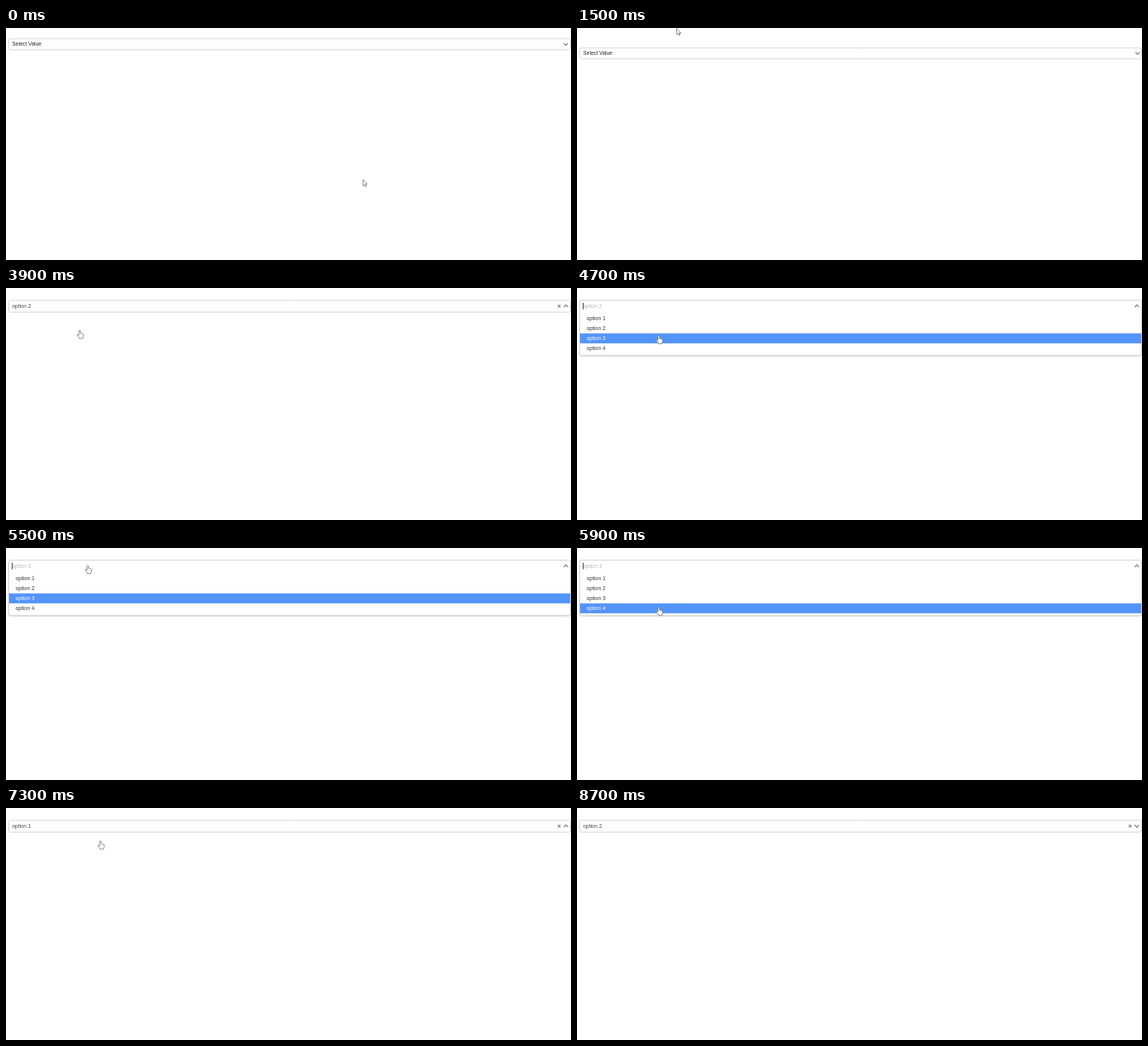
Recreate the animation shown at these times as an HTML page with a canvas. Size 736x303 px, loop 8.8 s.

```html
<!DOCTYPE html>
<html lang="en">
<head>
<meta charset="utf-8">
<title>Select box</title>
<style>
  html, body { margin: 0; width: 100%; height: 100%; overflow: hidden; background: #fff; }
  canvas { display: block; width: 736px; height: 303px; }
</style>
</head>
<body>
<canvas id="stage" width="736" height="303"></canvas>
<script>
const ctx = document.getElementById('stage').getContext('2d');
const LOOP = 8800, STEP = 100, ROW = 13, OPTIONS = 4;
const OPEN_MS = 600, BLUR = 8500;
const LEFT = 3.5, RIGHT = 735.5;
const FONT = '6.9px "Liberation Sans", Arial, sans-serif';

// When the list opens and where the pointer clicks; options are taken in turn
const picks = [
  { open: 1900, x: 86.5, y: 49 },
  { open: 3300, x: 96, y: 55 },
  { open: 4200, x: 106.5, y: 62 },
  { open: 5500, x: 106.5, y: 79 },
  { open: 6400, x: 123, y: 44.5 },
  { open: 7700, x: 124, y: 48 }
];

const mix = (a, b, k) => a + (b - a) * k;
const progress = (t, from, to) => Math.min(1, Math.max(0, (t - from) / (to - from)));
const smooth = k => k * k * (3 - 2 * k);
const easeIn = k => k ** 3;
const easeOut = k => 1 - (1 - k) ** 3;

// The field moves twice as the page around it is laid out
function fieldAt(t) {
  if (t < 800) return { top: 14, height: 14.5, mid: 21, shift: 0, rows: 31 };
  if (t < 2900) return { top: 26, height: 14.2, mid: 32.6, shift: 1, rows: 40.5 };
  return { top: 16, height: 15.5, mid: 23.3, shift: 0, rows: 33 };
}

function pointerAt(t, field) {
  const i = picks.findLastIndex(p => t >= p.open);
  if (i < 0) {
    const k = smooth(progress(t, 0, 900));
    const leave = progress(t, 1200, 1700);
    return [mix(465, 119, k) + 18 * leave, mix(198, 22, k ** 1.7) - 36 * leave];
  }
  const pick = picks[i], next = picks[i + 1];
  const rest = field.mid - 1;
  const close = pick.open + OPEN_MS;
  if (t < close) {
    const k = easeOut(progress(t, pick.open, close));
    const from = i ? picks[i - 1].x : pick.x + 10;
    return [mix(from, pick.x, k), mix(rest, pick.y, k)];
  }
  if (next) return [pick.x, mix(pick.y, rest, easeIn(progress(t, close, next.open)))];
  const k = progress(t, BLUR, BLUR + 150);
  return [pick.x + 8 * k, mix(pick.y, -14, k)];
}

function text(str, x, mid, color) {
  ctx.font = FONT;
  ctx.fillStyle = color;
  ctx.fillText(str, x, mid + 2.4);
}

function line(points, color, width) {
  ctx.beginPath();
  points.forEach(([x, y]) => ctx.lineTo(x, y));
  ctx.strokeStyle = color;
  ctx.lineWidth = width;
  ctx.stroke();
}

function chevron(x, y, up) {
  const d = up ? -1.5 : 1.5;
  line([[x - 2.8, y - d], [x, y + d], [x + 2.8, y - d]], '#8c8c8c', 1.4);
}

function cross(x, y) {
  for (const d of [-1.8, 1.8]) line([[x - 1.8, y - d], [x + 1.8, y + d]], '#808080', 1.2);
}

function box(x, y, w, h, r) {
  ctx.beginPath();
  ctx.roundRect(x, y, w, h, r);
}

const arrow = new Path2D('M0 0V8.3L1.9 6.6L3.2 9.4L4.5 8.8L3.2 6.1H5.5Z');
const hand = new Path2D('M-1 1Q0 -.7 1 1V4.2Q2 3.6 2.6 4.6Q3.6 4.1 4 5Q5 4.9 5 6V8' +
  'Q5 9.2 4 10.2V11H-.6V10.2L-3.2 6.8Q-3.3 5.4 -2 5.8L-1 6.8Z');

function pointer(x, y, shape) {
  ctx.save();
  ctx.translate(x, y);
  ctx.fillStyle = '#fff';
  ctx.fill(shape);
  ctx.strokeStyle = '#6c6c6c';
  ctx.lineWidth = 0.8;
  ctx.stroke(shape);
  ctx.restore();
}

function list(field, active) {
  const top = field.rows, bottom = top + OPTIONS * ROW + 3;
  ctx.save();
  ctx.shadowColor = 'rgba(0,0,0,.2)';
  ctx.shadowBlur = 3;
  ctx.shadowOffsetY = 1;
  ctx.fillStyle = '#fff';
  box(LEFT, field.top, RIGHT - LEFT, bottom - field.top, 2);
  ctx.fill();
  ctx.restore();
  box(LEFT, field.top, RIGHT - LEFT, bottom - field.top, 2);
  ctx.strokeStyle = '#d2d2d2';
  ctx.lineWidth = 1;
  ctx.stroke();

  for (let i = 0; i < OPTIONS; i++) {
    const y = top + i * ROW;
    if (i === active) {
      ctx.fillStyle = '#5394fa';
      ctx.fillRect(4, y + 0.3, 731, ROW);
    }
    text('option ' + (i + 1), 12.5, y + 6.7, i === active ? '#fff' : '#333');
  }
}

function draw(t) {
  const field = fieldAt(t), { top, height, mid, shift } = field;
  const [px, py] = pointerAt(t, field);
  const open = picks.some(p => t >= p.open && t < p.open + OPEN_MS);
  const done = picks.filter(p => t >= p.open + OPEN_MS).length;
  const value = done ? (done - 1) % OPTIONS + 1 : 0;
  const focused = t >= picks[0].open && t < BLUR;

  ctx.fillStyle = '#fff';
  ctx.fillRect(0, 0, 736, 303);

  if (open) {
    const hover = Math.floor((py - field.rows) / ROW);
    list(field, hover >= 0 && hover < OPTIONS ? hover : Math.max(0, value - 1));
  } else {
    box(LEFT, top, RIGHT - LEFT, height, 2);
    ctx.strokeStyle = '#d6d6d6';
    ctx.lineWidth = 1;
    ctx.stroke();
  }

  const color = !value ? '#222' : open ? '#b8b8b8' : '#444';
  text(value ? 'option ' + value : 'Select Value', 8, mid, color);
  if (open) {
    ctx.fillStyle = '#222';
    ctx.fillRect(7.6, mid - 4, 1, 8.5);
  } else if (value) {
    cross(720.5 + shift, mid + 0.3);
  }
  chevron(729.3 + shift, mid + 0.3, focused);
  pointer(px, py, focused || t === BLUR ? hand : arrow);
}

const start = performance.now();
function tick() {
  const t = (performance.now() - start) % LOOP;
  draw(Math.floor(t / STEP) * STEP);
  requestAnimationFrame(tick);
}
tick();
</script>
</body>
</html>
```
